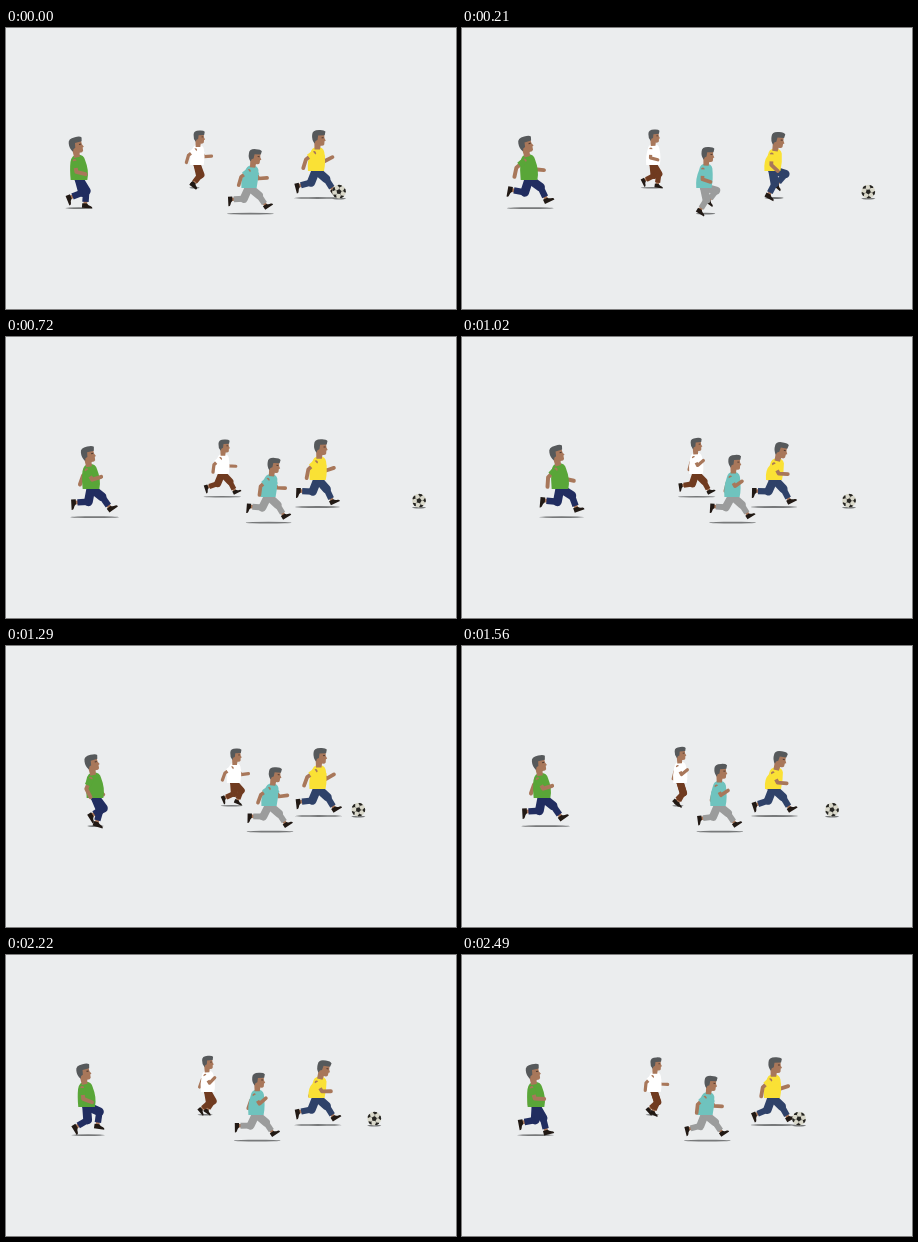
Recreate the animation shown at these times as an HTML page with a canvas. Size 450 by 281 pixels, loop 2520 ms.

```html
<!DOCTYPE html>
<html lang="en">
<head>
<meta charset="utf-8">
<title>Football run</title>
<style>
  html, body { margin: 0; width: 100%; height: 100%; overflow: hidden; background: #ebedee; }
  canvas { display: block; width: 450px; height: 281px; }
</style>
</head>
<body>
<canvas id="stage"></canvas>
<script>
const LOOP = 2520, STEP = 30, TAU = Math.PI * 2;
const SKIN = '#a8775a', HAIR = '#56595b', SHOE = '#211914', SHADOW = '#77797a';

const canvas = document.getElementById('stage');
const ctx = canvas.getContext('2d');
const ratio = window.devicePixelRatio || 1;
canvas.width = 450 * ratio;
canvas.height = 281 * ratio;

// Foot loops: [cycle position, x, y], measured from the hip.
const RUN = [[0, 18, 20], [.12, 16, 21.5], [.3, 0, 25], [.45, -17, 17],
             [.5, -18, 15], [.62, -19, 11], [.8, 0, 12], [.95, 17, 21]];
const SPRINT = [[0, 19, 20], [.13, 18, 20.5], [.3, 0, 24.5], [.45, -18, 15],
                [.5, -19, 12], [.62, -20, 10], [.8, 0, 12], [.95, 20, 21]];
const JOG = [[0, -4, 22], [.12, 16, 21], [.2, 14, 22], [.35, 4, 24],
             [.45, -1, 24], [.5, -5, 23], [.6, -17, 13], [.65, -18, 16], [.8, -12, 18], [.95, -6, 21]];
const WALK = [[0, -9, 17], [.08, 3, 17], [.215, 16, 19], [.32, 18, 19], [.357, 20, 20],
              [.465, 10, 24], [.5, 6, 24], [.58, -4, 25], [.715, -16, 11],
              [.82, -19, 8], [.857, -16, 13], [.965, -14, 15]];

// head: offset at the two ends of the stride; lift: forearm angle when forward (near, far).
const RUNNERS = {
  white: {
    shirt: '#ffffff', trousers: '#703b20', y: 137, scale: .84, period: 630, gait: JOG,
    arm: .05, lift: [2.4, 1.7], head: [[2, 0], [0, -2]], tilt: [0, -.05],
    x: [[0, 191], [390, 191], [720, 216], [1020, 234], [1560, 218], [1950, 210], [2490, 192]]
  },
  yellow: {
    shirt: '#fae135', trousers: '#2f4269', y: 143, scale: 1, period: 630, gait: RUN,
    arm: .05, lift: [1.6, 2.1], head: [[2, 0], [5, 3]], tilt: [0, .22],
    x: [[0, 310], [390, 311], [1020, 312], [1560, 311], [1950, 311]]
  },
  green: {
    shirt: '#59a638', trousers: '#212d60', y: 152, scale: 1.04, period: 840, gait: WALK,
    arm: .33, lift: [1.9, 1.6], head: [[-2, -1], [-2, 0]], tilt: [-.25, -.18],
    x: [[0, 73], [200, 67], [390, 70], [720, 85], [1020, 98], [1560, 80], [1950, 84], [2490, 74]]
  },
  teal: {
    shirt: '#6fc3be', trousers: '#9b9c9c', y: 160, scale: .95, period: 630, gait: SPRINT,
    arm: .05, lift: [2.3, 1.7], head: [[5, 0], [2, -3.5]], tilt: [.1, 0],
    x: [[0, 243], [390, 241], [720, 262], [1020, 270], [1560, 256], [1950, 257], [2490, 243]]
  }
};

const BALL_X = [[0, 333], [60, 398], [130, 410], [390, 383], [600, 338], [630, 336],
                [720, 413], [760, 414], [1020, 387], [1230, 339], [1260, 336],
                [1350, 399], [1560, 370], [1860, 338], [1890, 336], [1950, 406],
                [1990, 416], [2160, 377], [2490, 337]];

// Periodic monotone cubic through keys of the form [time, ...values].
function along(keys, period, time, column = 1) {
  const n = keys.length;
  const t = ((time % period) + period) % period;
  const key = i => {
    const k = keys[(i + n) % n];
    return [k[0] + Math.floor(i / n) * period, k[column]];
  };
  const slope = i => (key(i + 1)[1] - key(i)[1]) / (key(i + 1)[0] - key(i)[0]);
  const tangent = i => {
    const a = slope(i - 1), b = slope(i);
    return a * b <= 0 ? 0 : 2 * a * b / (a + b);
  };
  let i = n - 1;
  while (i > 0 && keys[i][0] > t) i--;
  const [t0, v0] = key(i), [t1, v1] = key(i + 1);
  const d = t1 - t0, u = (t - t0) / d, w = 1 - u;
  return v0 * (1 + 2 * u) * w * w + v1 * u * u * (3 - 2 * u)
       + d * u * w * (tangent(i) * w - tangent(i + 1) * u);
}

const mix = (a, b, u) => a + (b - a) * u;
const between = (p, q, u) => [mix(p[0], q[0], u), mix(p[1], q[1], u)];
const polar = (p, angle, r) => [p[0] + Math.sin(angle) * r, p[1] + Math.cos(angle) * r];

function line(points, width, color, cap = 'round') {
  ctx.lineWidth = width;
  ctx.strokeStyle = color;
  ctx.lineCap = cap;
  ctx.lineJoin = 'round';
  ctx.beginPath();
  points.forEach(p => ctx.lineTo(p[0], p[1]));
  ctx.stroke();
}

function ellipse(x, y, rx, ry, color) {
  ctx.fillStyle = color;
  ctx.beginPath();
  ctx.ellipse(x, y, rx, ry, 0, 0, TAU);
  ctx.fill();
}

function fillPath(path, color) {
  ctx.fillStyle = color;
  ctx.fill(new Path2D(path));
}

function drawLeg(foot, color) {
  const bone = 13.5, hip = [0, -1];
  let dx = foot[0] - hip[0], dy = foot[1] - hip[1];
  const reach = Math.hypot(dx, dy);
  const fit = Math.min(1, bone * 1.98 / reach), length = reach * fit;
  dx *= fit;
  dy *= fit;
  const ankle = [hip[0] + dx, hip[1] + dy];
  const bend = Math.sqrt(bone * bone - length * length / 4) / length;
  const knee = [hip[0] + dx / 2 + dy * bend, hip[1] + dy / 2 - dx * bend];
  const cuff = between(knee, ankle, .78);
  line([knee, ankle], 3.6, SKIN);
  line([hip, knee], 8.5, color);
  line([knee, cuff], 6.2, color, 'butt');

  ctx.save();
  ctx.translate(ankle[0], ankle[1]);
  ctx.rotate(Math.atan2(ankle[1] - knee[1], ankle[0] - knee[0]) - Math.PI / 2);
  fillPath('M-3 -1.5 L1.5 -1.5 Q3 .4 5.5 .8 Q7.3 1.3 7 3 L-3 3 Z', SHOE);
  ctx.restore();
}

// swing: 1 is fully back, -1 fully forward.
function drawArm(shoulder, swing, lift, shirt) {
  const upper = -.2 - .75 * swing;
  const fore = mix(lift, -.35, (swing + 1) / 2);
  const elbow = polar(shoulder, upper, 10.5);
  const hand = polar(elbow, fore, 9);
  line([shoulder, elbow, hand], 3.8, SKIN);
  line([shoulder, between(shoulder, elbow, .65)], 6, shirt, 'butt');
}

function drawHead(x, y, tilt) {
  ctx.save();
  ctx.translate(x, y - 26);
  ctx.rotate(tilt);
  fillPath('M-4 -7 L-3 -12 L6 -12 L6.3 -7 L7.7 -4.4 L6.4 -3.8 L6.2 -.6 Q5.5 1 2.5 .6 L2 4.5 L-3.5 4.5 Z', SKIN);
  fillPath('M-6 -10 Q-6 -15 1 -15 Q6 -15.3 7.3 -13.5 L6.6 -9.8 L0 -9.5 L-.6 -5 L-2.6 -4 L-3.4 -1.5 Q-6.5 -5 -6 -10 Z', HAIR);
  line([[3.5, -7.4], [5.5, -7.4]], 1, '#513b31', 'butt');
  ctx.restore();
}

function drawRunner(runner, time) {
  const cycle = time / runner.period;
  const hipX = along(runner.x, LOOP, time);
  const footAt = c => [along(runner.gait, 1, c, 1), along(runner.gait, 1, c, 2)];
  const near = footAt(cycle), far = footAt(cycle + .5);
  const swing = Math.cos(TAU * (cycle - runner.arm));
  const sway = (1 - swing) / 2;
  const [start, end] = runner.head;
  const headX = mix(start[0], end[0], sway), headY = mix(start[1], end[1], sway);
  const topX = headX * .6, topY = headY * .8;

  ctx.save();
  ctx.translate(hipX, runner.y);
  ctx.scale(runner.scale, runner.scale);
  const left = Math.min(near[0], far[0]) - 4, right = Math.max(near[0], far[0]) + 7;
  ellipse((left + right) / 2, 27, (right - left) / 2, .9, SHADOW);

  drawArm([topX + 2, topY - 19], -swing, runner.lift[1], runner.shirt);
  drawLeg(far, runner.trousers);
  drawLeg(near, runner.trousers);

  ctx.fillStyle = runner.shirt;
  ctx.beginPath();
  ctx.moveTo(-8, 0);
  ctx.quadraticCurveTo(-9, -10, topX - 7, topY - 17);
  ctx.quadraticCurveTo(topX - 6, topY - 24, topX, topY - 24);
  ctx.quadraticCurveTo(topX + 6, topY - 24, topX + 7, topY - 19);
  ctx.quadraticCurveTo(10, -9, 8, 0);
  ctx.closePath();
  ctx.fill();

  drawHead(headX, headY, mix(runner.tilt[0], runner.tilt[1], sway));
  drawArm([topX - 3, topY - 18], swing, runner.lift[0], runner.shirt);
  ctx.restore();
}

function pentagon(x, y, r, turn) {
  ctx.beginPath();
  for (let i = 0; i < 5; i++) {
    const a = turn + i * TAU / 5;
    ctx.lineTo(x + r * Math.cos(a), y + r * Math.sin(a));
  }
  ctx.fill();
}

function drawBall(time) {
  const x = along(BALL_X, LOOP, time);
  ellipse(x, 170.6, 7, .8, SHADOW);
  ctx.save();
  ctx.translate(x, 163.7);
  ellipse(0, 0, 6.9, 6.9, '#d9d8ca');
  ctx.clip();
  ctx.rotate(x / 7);
  ctx.fillStyle = '#262522';
  pentagon(0, 0, 2.7, 0);
  for (let i = 0; i < 5; i++) {
    const a = i * TAU / 5;
    const c = Math.cos(a), s = Math.sin(a);
    line([[2.5 * c, 2.5 * s], [5 * c, 5 * s]], .5, '#77766c');
    pentagon(6.5 * c, 6.5 * s, 2.3, a + Math.PI);
  }
  ctx.restore();
}

function frame(now) {
  const time = Math.floor((now % LOOP) / STEP) * STEP;
  ctx.setTransform(ratio, 0, 0, ratio, 0, 0);
  ctx.fillStyle = '#ebedee';
  ctx.fillRect(0, 0, 450, 281);
  drawRunner(RUNNERS.white, time);
  drawRunner(RUNNERS.yellow, time);
  drawBall(time);
  drawRunner(RUNNERS.green, time);
  drawRunner(RUNNERS.teal, time);
  requestAnimationFrame(frame);
}
requestAnimationFrame(frame);
</script>
</body>
</html>
```
